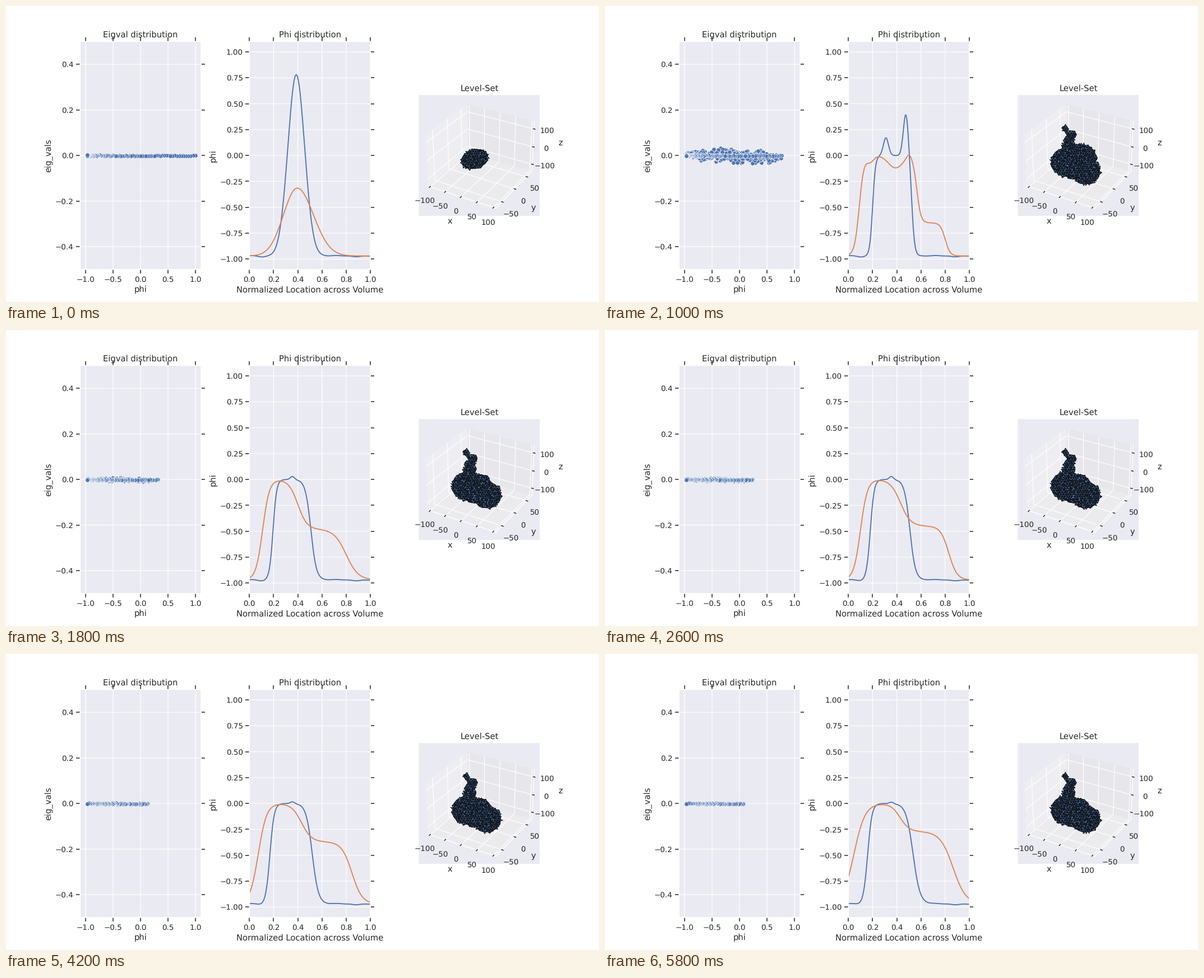
A matplotlib script for the animation above (7.8 s loop, 1058 by 529 pixels).

```python
import numpy as np
import matplotlib.pyplot as plt
from matplotlib.animation import FuncAnimation
from matplotlib.collections import PolyCollection
from matplotlib.tri import Triangulation

W, H = 1058, 529
BLUE, ORANGE, INK, PANEL, MESH = "#4C72B0", "#DD8452", "#262626", "#EAEAF2", "#111518"
STEPS, LAST, STEP_MS = 39, 29, 200
GROWN = 5  # step at which the seed has become the full shape

plt.rcParams.update({
    "font.family": "DejaVu Sans", "font.size": 12, "text.hinting": "none",
    "axes.titlesize": 12, "axes.labelsize": 12,
    "xtick.labelsize": 11, "ytick.labelsize": 11,
    "axes.facecolor": PANEL, "axes.edgecolor": "white", "axes.linewidth": 1.25,
    "axes.grid": True, "axes.axisbelow": True, "path.snap": False,
    "grid.color": "white", "grid.linewidth": 1,
    "text.color": INK, "axes.labelcolor": INK,
    "xtick.color": INK, "ytick.color": INK,
    "xtick.major.size": 6, "ytick.major.size": 6,
    "xtick.major.width": 1.25, "ytick.major.width": 1.25,
})


def track(s, *values):
    """Value at step s, led through the main stages of the run."""
    return np.interp(s, [5, 9, 13, 17, 29], values)


# Phi profiles
X = np.linspace(0, 1, 301)


def bell(mid, left, right=None):
    width = np.where(X < mid, left, right or left)
    return np.exp(-0.5 * ((X - mid) / width) ** 2)


def rise(mid, width):
    return 1 / (1 + np.exp(-(X - mid) / width))


FLOOR = (-.971 + .004 * bell(0, .05) - .009 * bell(.11, .03) + .005 * bell(.72, .05)
         - .006 * bell(.88, .03) + .001 * np.sin(55 * X))
NARROW_SEED = FLOOR + 1.75 * bell(.387, .069)
WIDE_SEED = -.97 + .655 * bell(.395, .114, .134)


def narrow(s):
    up = rise(track(s, .2, .195, .181, .175, .159), track(s, .012, .015, .016, .017, .018))
    down = rise(track(s, .524, .508, .508, .512, .534), track(s, .0125, .023, .023, .024, .029))
    peaks = track(s, 1, 0, 0, 0, 0) * (.17 * bell(.31, .021) + .41 * bell(.475, .021))
    bump = track(s, 0, .03, .03, .02, .015) * bell(.355, .017)
    return FLOOR * (1 - up * (1 - down)) + peaks + bump


def wide(s):
    up = rise(track(s, .09, .109, .1, .087, .046), track(s, .02, .028, .0285, .029, .046))
    drop = track(s, .65, .48, .45, .42, .27)
    first = rise(track(s, .565, .4, .43, .432, .427), track(s, .017, .038, .042, .043, .038))
    second = rise(track(s, .8, .8, .83, .839, .865), track(s, .02, .05, .034, .037, .053))
    sag = .12 * bell(.39, .06) + .06 * bell(.18, .03) - .04 * bell(.5, .02)
    level = .97 - drop * first - (.97 - drop) * second
    return -.97 + up * level - track(s, 1, 0, 0, 0, 0) * sag


def grow(seed, curve, s):
    """Mix from the seed profile into the evolving one."""
    t = min(s / GROWN, 1)
    return seed * (1 - t) + curve(s) * t


# Eigenvalue cloud
def cloud(s):
    rng = np.random.default_rng(7)
    span = .97 + np.interp(s, [0, 5, 9, 17, 29], [1, .76, .31, .16, .07])
    spread = np.interp(s, [0, 3, 5, 9, 29], [.001, .05, .046, .012, .004])
    power = np.interp(s, [0, 5, 13, 29], [2.5, 1.7, 1, .75])

    # Loose points lie under a spine that is laid down from right to left.
    w = rng.random(500) ** 1.15
    y = np.clip(rng.normal(0, .32, 500), -.9, .9) * np.sin(np.pi * w) ** .6 + .15 - .4 * w
    loose = np.column_stack([-.97 + span * w, spread * y])
    loose = loose[:int(500 * min(spread / .03, 1))]

    u = np.linspace(0, 1, 110)
    x = -.97 + span * u ** power
    order = np.argsort(-(x + rng.normal(0, .025, 110) * u))
    y = rng.normal(0, .001, 110) - .0015 * u
    return np.vstack([loose, np.column_stack([x, y])[order]])


# Level-set mesh in stage pixels: ellipses as middle x, y, radii and tilt
SEED = np.array([836, 273.5, 24.3, 17, -.3])
PARTS = np.array([
    (821, 218.5, 5, 4.5, 0),     # ear tip
    (825.5, 227, 8, 3, 1.08),    # ear
    (834, 230, 6.5, 6.5, 0),     # other ear
    (828, 241, 9, 9, 0),         # head
    (827, 250, 11, 9, 0),        # chest
    (824, 279, 28, 26, 0),       # front
    (858, 295, 25, 23.5, 0),     # hind
    (840, 297, 22, 13, 0),       # belly
    (876, 283, 5, 5, 0),         # tail
])
HUMP = np.array([850, 269, 27, 22, .25])
BACK = np.array([847, 275, 17, 17, 0])

GAP = 4.3
gx, gy = np.meshgrid(np.arange(786, 892, GAP), np.arange(208, 326, GAP * .87))
gx = gx + (np.arange(len(gx)) % 2)[:, None] * GAP / 2
GRID = np.column_stack([gx.ravel(), gy.ravel()])
GRID += np.random.default_rng(4).uniform(-1.2, 1.2, GRID.shape)
TINT = np.array([76, 114, 176]) / 255
ANGLE = np.linspace(0, 2 * np.pi, 40)


def body(s):
    t = min(s / GROWN, 1)
    settle = np.interp(s, [5, 9], [0, 1])
    parts = np.vstack([PARTS, HUMP * (1 - settle) + BACK * settle])
    return SEED * (1 - t) + parts * t


def inside(points, parts):
    hit = np.zeros(len(points), bool)
    for cx, cy, a, b, tilt in parts:
        dx, dy = (points - (cx, cy)).T
        c, q = np.cos(tilt), np.sin(tilt)
        hit |= ((dx * c + dy * q) / a) ** 2 + ((dy * c - dx * q) / b) ** 2 < 1
    return hit


def outline(cx, cy, a, b, tilt):
    x, y = a * np.cos(ANGLE), b * np.sin(ANGLE)
    c, q = np.cos(tilt), np.sin(tilt)
    return np.column_stack([cx + x * c - y * q, cy + x * q + y * c])


def mesh(s):
    rng = np.random.default_rng(100 + s)
    parts = body(s)
    points = GRID + rng.normal(0, .3, GRID.shape)
    tris = points[Triangulation(*points.T).triangles]
    tris = tris[inside(tris.mean(axis=1), parts)]
    shade = rng.uniform(.8, 1.25, (len(tris), 1))
    backing = [outline(*p) for p in parts - (0, 0, .8, .8, 0)]
    return backing + list(tris), [MESH] * len(backing) + list(np.clip(TINT * shade, 0, 1))


# Figure
fig = plt.figure(figsize=(12, 6), dpi=W / 12, facecolor="white")
fig.subplots_adjust(left=.125, right=.9, bottom=.11, top=.88, wspace=.4)


def flat_panel(pos, title, xlabel, ylabel, xlim, ylim, xticks, yticks):
    ax = fig.add_subplot(1, 3, pos)
    ax.set(xlim=xlim, ylim=ylim, xticks=xticks, yticks=yticks,
           xlabel=xlabel, ylabel=ylabel)
    ax.set_title(title, y=1.0)
    ax.tick_params(top=True, right=True)
    return ax


eig_ax = flat_panel(1, "Eigval distribution", "phi", "eig_vals", (-1.1, 1.1), (-.5, .5),
                    np.linspace(-1, 1, 5), np.linspace(-.4, .4, 5))
phi_ax = flat_panel(2, "Phi distribution", "Normalized Location across Volume", "phi",
                    (0, 1), (-1.1, 1.1), np.linspace(0, 1, 6), np.linspace(-1, 1, 9))

box = fig.add_subplot(1, 3, 3, projection="3d")
box.set(xlim=(-107, 107), ylim=(-73.5, 73.5), zlim=(-141, 141),
        xticks=range(-100, 101, 50), yticks=(-50, 0, 50), zticks=(-100, 0, 100),
        xlabel="x", ylabel="y", zlabel="z")
box.set_title("Level-Set", y=1.0)
box.title.set_y(1.0)  # 3D axes lower their title by themselves

stage = fig.add_axes([0, 0, 1, 1], zorder=5)
stage.set(xlim=(0, W), ylim=(H, 0))
stage.axis("off")

dots = eig_ax.scatter([], [], s=36, color=BLUE, edgecolors="white", linewidths=.5, zorder=3)
narrow_line, = phi_ax.plot(X, X, color=BLUE, lw=1.5)
wide_line, = phi_ax.plot(X, X, color=ORANGE, lw=1.5)
solid = PolyCollection([], edgecolors=MESH, linewidths=1)
stage.add_collection(solid, autolim=False)


def draw(i):
    s = min(i, LAST)
    dots.set_offsets(cloud(s))
    narrow_line.set_ydata(grow(NARROW_SEED, narrow, s))
    wide_line.set_ydata(grow(WIDE_SEED, wide, s))
    verts, colours = mesh(s)
    solid.set_verts(verts)
    solid.set_facecolor(colours)
    return dots, narrow_line, wide_line, solid


anim = FuncAnimation(fig, draw, frames=STEPS, interval=STEP_MS,
                     init_func=lambda: draw(0), repeat=True, repeat_delay=0, blit=False)
plt.show()
```
